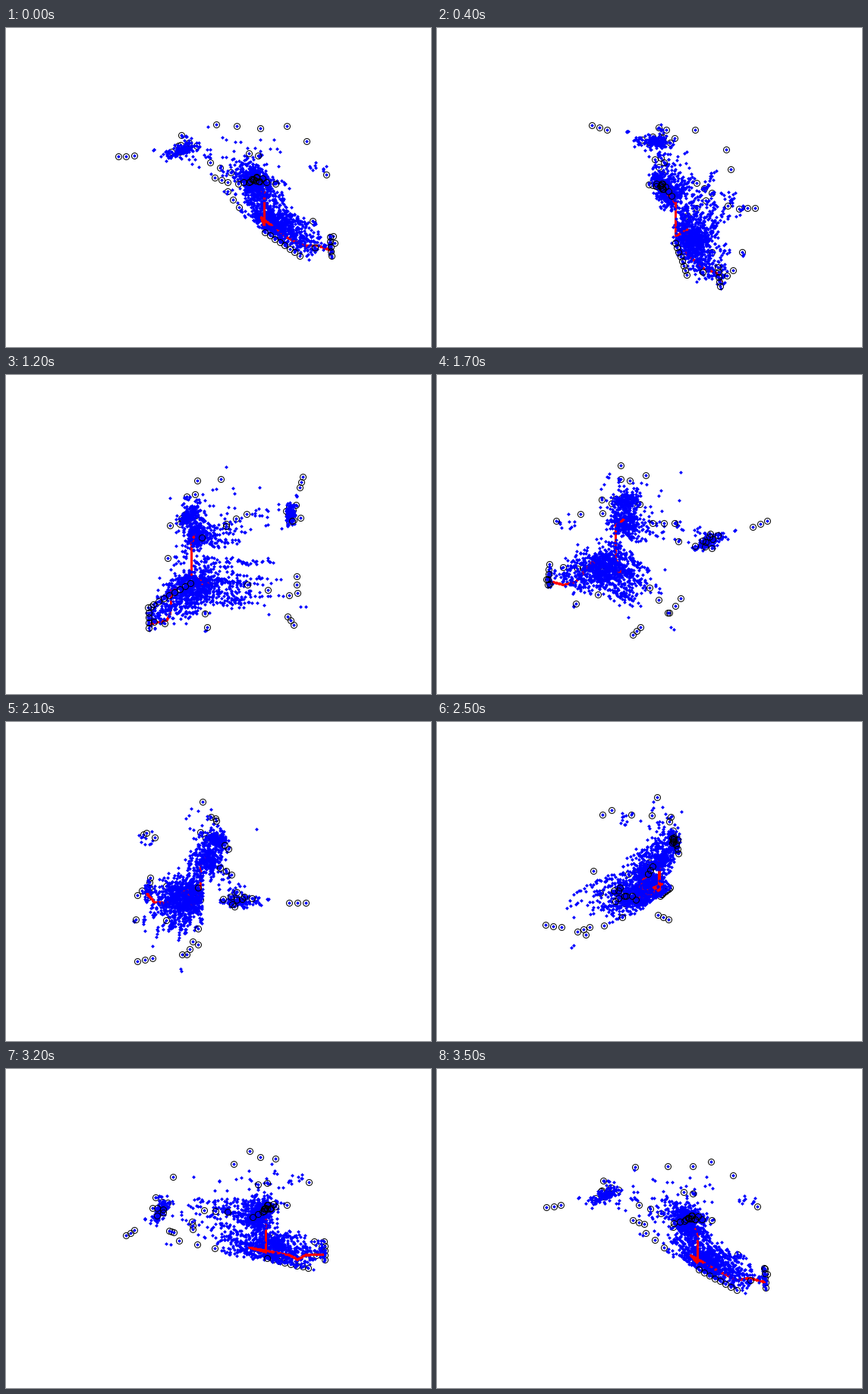
Animation, 560 px wide and 420 px high, one loop 3600 ms. Source, as a matplotlib script:

```python
import numpy as np
import matplotlib.pyplot as plt
from matplotlib.animation import FuncAnimation

W, H, DPI = 560, 420, 100
FRAMES, STEP = 36, 10      # turntable, degrees per frame
CX, TILT = 289.5, 0.5      # axis of rotation, sine of the elevation
PX = 72 / DPI              # points per pixel
AWAY = np.array([-0.65, -1, -0.05])   # direction the trails run in

rng = np.random.default_rng(12)

# Points are (across, depth, height): depth grows towards the viewer, height grows downwards.


def blob(n, centre, spread):
    return rng.normal(centre, spread, (n, 3))


def line(n, a, b, spread=0):
    """Evenly spaced points from a to b, optionally scattered."""
    return np.linspace(a, b, n) + rng.normal(0, 1, (n, 3)) * spread


def trails(starts, longest):
    """A short, slightly uneven dotted trail leading away from each start."""
    rows = []
    for start in starts:
        n = rng.integers(1, longest + 1)
        rows.append(start + np.cumsum(rng.uniform(2, 8, n))[:, None] * AWAY)
    pts = np.vstack(rows)
    return pts + rng.normal(0, 0.8, pts.shape)


def ground():
    """A sloping floor, dense near the path and fanning out behind it."""
    p = rng.normal(69, 22, 760)
    q = 9 + 0.2 * (p - 68) + rng.normal(0, 14, p.size) - rng.exponential(6, p.size)
    h = 254 + 0.25 * (p - 68) + rng.normal(0, 12, p.size)
    dense = np.column_stack([p, q, h])

    far = rng.exponential(38, 135)
    p = rng.normal(67, 25, far.size) - 0.3 * far
    h = 256 + 0.15 * (p - 65) + rng.normal(0, 13, far.size)
    fan = trails(np.column_stack([p, 8 - far, h]), 5)

    pts = np.vstack([dense, fan])
    p, q, h = pts.T
    keep = ((h + q / 2 < 264 + 0.52 * (p - 53)) & (0.766 * p - 0.643 * q > 30)
            & (q < 18 + 0.18 * p) & (q > -118) & (p < 125))
    return pts[keep]


def facade():
    return np.vstack([
        blob(150, (40, 29, 179), (9, 4, 6)),
        blob(220, (43, 15, 199), (9, 7, 8)),
        trails(blob(32, (40, 4, 197), (13, 10, 9)), 5),
        blob(32, (42, 18, 163), (13, 9, 11)),
    ])


def outpost():
    """The wall on the left, seen edge-on at one point of the turn."""
    across = rng.normal(0, 10, 125)
    pts = np.column_stack([across, -0.84 * across, 0 * across])
    return pts + blob(across.size, (-69, -53, 193), (3, 3, 3.5))


wall = outpost()

singles = np.array([
    (14.5, -4, 130), (47.5, 9, 123.5), (71.5, -60, 152), (100.5, -43, 161.5),
    (132.5, -11, 186.5), (-28.5, -90, 174), (47.5, 27, 150.5), (35.5, 23, 150.5),
    (72.5, 35, 181.5), (106.5, -57, 272.5), (123.5, 25, 265.5), (77.5, -29, 274.5),
])

rings = np.vstack([
    singles,
    wall[:7],
    line(3, (-145.5, -10, 187), (-126.5, -21, 189.5)),
    line(2, (-70.5, -62, 178), (-72.5, -68, 194)),
    line(3, (5.5, -5, 192), (-23.5, -16, 187)),
    line(3, (9.5, -45, 257.5), (-14.5, -97, 264)),
    line(3, (-16.5, -109, 258.5), (-31.5, -95, 246.5)),
    line(3, (21.5, -124, 270), (31.5, -143, 270.5)),
    line(5, (142, 14, 256), (143.5, 12, 281.5)),
    line(2, (145.5, 1, 269.5), (141.5, -13, 268.5)),
    line(8, (55, 14, 257), (105, 36, 273)),
    blob(14, (43, 32, 181), (8, 2, 3)),
])

dots = np.vstack([
    rings, wall, ground(), facade(),
    line(40, (65, 6, 221), (13, -90, 212), (4, 4, 1)),
    line(30, (-55, -42, 190), (20, -2, 186), (6, 8, 9)),
    line(30, (100, 22, 266), (140, 8, 270), (4, 6, 5)),
    blob(28, (142, 8, 270), (1.5, 4, 7)),
    blob(10, (115, -22, 182), (7, 5, 4)),
    blob(6, (-64, -61, 178), (4, 2, 1)),
    blob(3, (-102, -36, 187), (1, 1, 0.7)),
    blob(7, (25, -10, 150), (35, 18, 6)),
])

path = np.array([
    (44, 17, 199), (54, 13, 205), (54, 13, 249), (45, -15, 253),
    (85, 22, 257), (106, 6, 275), (122, -1, 276), (142, 9, 276),
])
PIVOT = np.array([[54, 13, 215]])

fig = plt.figure(figsize=(W / DPI, H / DPI), dpi=DPI, facecolor="white")
ax = fig.add_axes([0, 0, 1, 1])
ax.set_xlim(0, W)
ax.set_ylim(H, 0)
ax.axis("off")


def dot_layer(z):
    return ax.plot([], [], "D", color="#0000ff", ms=3.4 * PX, mew=0,
                   antialiased=False, zorder=z)[0]


def ring_layer(z):
    return ax.plot([], [], "o", mfc="none", mec="black", ms=8 * PX, mew=PX,
                   antialiased=False, zorder=z)[0]


back_rings, back_dots = ring_layer(1), dot_layer(2)
track, = ax.plot([], [], color="#ff0000", lw=2.2 * PX, antialiased=False, zorder=3)
front_dots, front_rings = dot_layer(4), ring_layer(5)


def project(pts, angle):
    p, q, h = pts.T
    c, s = np.cos(angle), np.sin(angle)
    depth = q * c + p * s
    return CX + p * c - q * s, h + TILT * depth, depth


def update(i):
    angle = np.radians(STEP * (i + 1))
    split = project(PIVOT, angle)[2][0]
    for pts, back, front in ((dots, back_dots, front_dots),
                             (rings, back_rings, front_rings)):
        x, y, depth = project(pts, angle)
        near = depth > split
        back.set_data(x[~near], y[~near])
        front.set_data(x[near], y[near])
    track.set_data(*project(path, angle)[:2])
    return back_rings, back_dots, track, front_dots, front_rings


anim = FuncAnimation(fig, update, frames=FRAMES, interval=100, repeat=True,
                     repeat_delay=0, blit=False)
plt.show()
```
